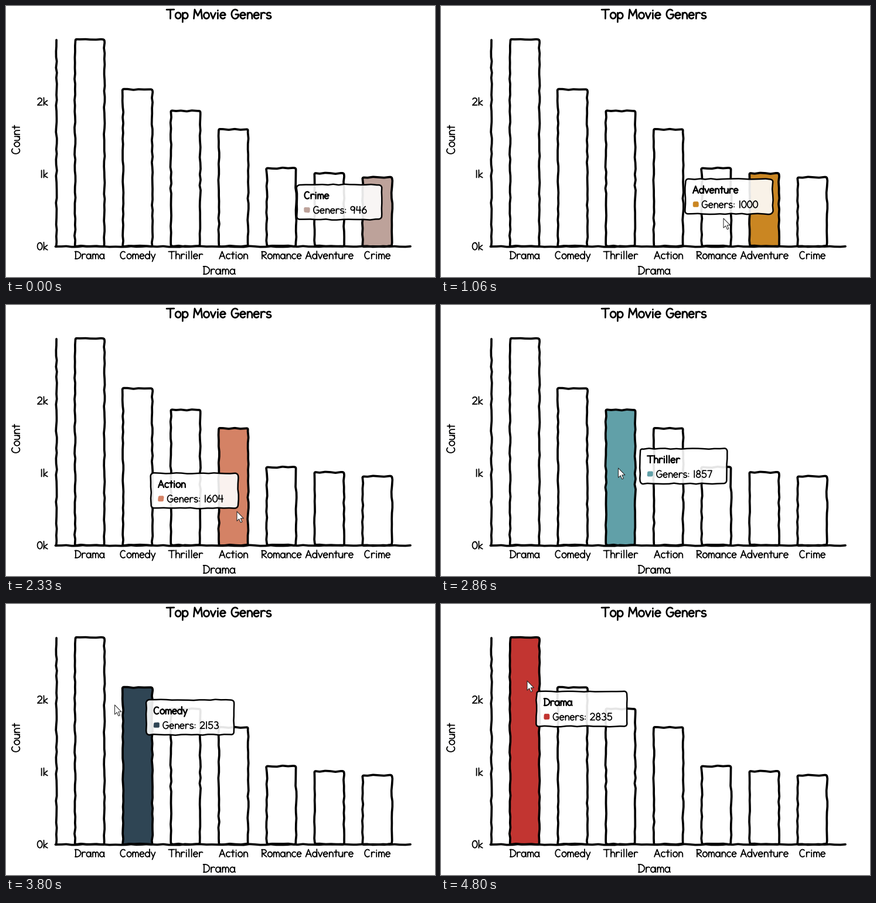
Recreate the animation shown at these times as a matplotlib script. Size 732 by 462 pixels, loop 4.87 s.

```python
import numpy as np
import matplotlib.pyplot as plt
from matplotlib.animation import FuncAnimation
from matplotlib.patches import PathPatch
from matplotlib.path import Path

W, H, DPI = 732, 462, 64
LOOP_MS, FRAMES = 4870, 146
INK = "black"
rng = np.random.default_rng(4)

GENRES = ["Drama", "Comedy", "Thriller", "Action", "Romance", "Adventure", "Crime"]
COUNTS = [2835, 2153, 1857, 1604, 1071, 1000, 946]
COLORS = ["#c23531", "#2f4554", "#61a0a8", "#d48265", "#749f83", "#ca8622", "#bda29a"]
BASE, PER_COUNT = 409.5, 0.1242
BAR_W, FIRST, STEP = 50, 142.7, 81.8


# ---- handwritten stroke lettering, baseline at 0, y up ----
def line(*xy):
    return np.reshape(xy, (-1, 2)).astype(float)


def arc(cx, cy, rx, ry, a0, a1):
    a = np.radians(np.linspace(a0, a1, 20))
    return np.column_stack([cx + rx * np.cos(a), cy + ry * np.sin(a)])


def join(*parts):
    return np.vstack(parts)


def ring(cx, cy, rx, ry, start=80):
    return arc(cx, cy, rx, ry, start, start + 360)


def bowl(cx=4.4):
    return ring(cx, 4.1, 3.6, 4.1, 30)


def stem(x, top, bottom=0):
    return line(x, top, x + 0.1, (top + bottom) / 2, x, bottom)


def arch(x, w):
    return join(arc(x + w / 2, 4.5, w / 2, 3.7, 175, 0), line(x + w + 0.1, 0))


GLYPHS = {" ": (6, [])}


def glyph(char, width, *strokes):
    GLYPHS[char] = (width, strokes)


glyph("a", 10, bowl(), line(8.1, 8, 7.9, 2, 8.8, 0))
glyph("c", 8.5, arc(4.7, 4.2, 3.7, 4.2, 50, 310))
glyph("d", 9.6, bowl(), stem(8, 13))
glyph("e", 9.5, join(line(1.2, 4.4, 8, 4.8), arc(4.6, 4.2, 3.6, 4.2, 12, 318)))
glyph("h", 9.2, stem(1.5, 13), arch(1.5, 6.2))
glyph("i", 4.4, stem(2, 8), line(2, 11, 2.1, 11.4))
glyph("k", 8.5, stem(1.5, 13), line(7.4, 8, 1.8, 3.6, 7.8, 0))
glyph("l", 4.4, stem(2, 13))
glyph("m", 12.6, stem(1.4, 8), arch(1.4, 4.8), arch(6.2, 4.8))
glyph("n", 9.2, stem(1.5, 8), arch(1.5, 6.2))
glyph("o", 9.5, ring(4.7, 4.2, 3.7, 4.2))
glyph("p", 9.5, stem(1.4, 8, -4.8), bowl(5))
glyph("r", 8, stem(1.5, 8), arc(4.9, 4.5, 3.4, 3.7, 175, 50))
glyph("s", 8.4, join(arc(4.2, 6.2, 2.8, 2.1, 40, 250), arc(4, 2.1, 3.1, 2.1, 80, -150)))
glyph("t", 7.2, line(3.8, 11.6, 3.6, 0.2), line(0.6, 8, 6.5, 8.2))
glyph("u", 9.4, join(line(1.3, 8), arc(4.4, 3.3, 3.1, 3.3, 180, 360)), stem(7.7, 8))
glyph("v", 8.8, line(1, 8, 4.2, 0, 7.8, 8))
glyph("y", 9, line(1, 8, 4.4, 1), line(8, 8, 3, -4.6))
glyph("A", 11.8, line(1, 0, 5.6, 12.5, 10.6, 0), line(2.6, 4.4, 9, 4.4))
glyph("C", 11.3, arc(6, 6.2, 4.8, 6.3, 50, 310))
glyph("D", 11.8, stem(2, 12.4), join(line(0.8, 12.3), arc(3.5, 6.2, 7.2, 6.2, 88, -90), line(1.2, 0)))
glyph("G", 12, join(arc(6, 6.2, 5, 6.3, 50, 325), line(10.5, 5.8, 6.6, 5.8)))
glyph("M", 14, line(1.3, 0, 2.5, 12.5, 6.8, 4, 11.2, 12.5, 12.6, 0))
glyph("R", 10.4, stem(1.6, 12.4), join(line(0.8, 12.2), arc(4.5, 9.2, 4.2, 3.1, 90, -90), line(2, 6, 9.3, 0)))
glyph("T", 11.8, line(0.6, 12.3, 11, 12.5), stem(5.8, 12.3))
glyph("0", 10.3, ring(5, 6.2, 4.1, 6.1))
glyph("1", 4.5, stem(2.1, 12.4))
glyph("2", 10.3, join(arc(4.9, 9, 3.6, 3.4, 160, -30), line(1.2, 0.2, 9, 0.4)))
glyph("3", 10.3, join(arc(4.5, 9.3, 3.3, 3.1, 140, -80), arc(4.7, 3.2, 3.9, 3.2, 85, -145)))
glyph("4", 10.3, line(2.2, 12.4, 1.2, 5.6, 8.9, 5.8), stem(7.2, 12.4))
glyph("5", 10.3, join(line(8.3, 12.4, 2.4, 12.4, 1.8, 7), arc(4.7, 3.9, 3.9, 3.9, 120, -150)))
glyph("6", 10.3, join(line(6.8, 12.4, 3, 8.8), arc(4.9, 3.8, 3.7, 3.8, 165, 525)))
glyph("7", 9.6, line(1, 12.3, 8.4, 12.4, 3.6, 0))
glyph("8", 10.3, ring(4.9, 9.4, 2.9, 3), ring(4.9, 3.2, 3.6, 3.2))
glyph("9", 10.3, ring(4.6, 8.9, 3.4, 3.5, 0), line(8.1, 11, 7.5, 0))
glyph(":", 4, line(1.8, 1.6, 1.8, 1.9), line(1.8, 6.8, 1.8, 7.1))


def text_width(s, size):
    return size * sum(GLYPHS[c][0] for c in s)


def text_path(s, x, y, size=1.0, align=0.0, up=False):
    pen = -align * text_width(s, size)
    parts = []
    for c in s:
        width, strokes = GLYPHS[c]
        for p in strokes:
            u, v = pen + size * p[:, 0], -size * p[:, 1]
            xy = (x + v, y - u) if up else (x + u, y + v)
            parts.append(Path(np.column_stack(xy)))
        pen += size * width
    return Path.make_compound_path(*parts)


# ---- wobbly shapes ----
def rough(pts, amp, closed=False):
    pts = np.asarray(pts, float)
    if closed:
        pts = np.vstack([pts, pts[:1]])
    d = np.append(0, np.cumsum(np.hypot(*np.diff(pts, axis=0).T)))
    t = np.linspace(0, d[-1], int(d[-1] / 1.5) + 2)
    knots = np.linspace(0, d[-1], max(5, int(d[-1] / 9)))
    noise = rng.uniform(-amp, amp, (2, len(knots)))
    if closed:
        noise[:, -1] = noise[:, 0]
    xy = [np.interp(t, d, pts[:, k]) + np.interp(t, knots, noise[k]) for k in (0, 1)]
    return Path(np.column_stack(xy), closed=closed)


def round_rect(x, y, w, h, r):
    return join(arc(x + r, y + r, r, r, 180, 270), arc(x + w - r, y + r, r, r, 270, 360),
                arc(x + w - r, y + h - r, r, r, 0, 90), arc(x + r, y + h - r, r, r, 90, 180))


def shift(path, x, y):
    return Path(path.vertices + (x, y), path.codes)


fig = plt.figure(figsize=(W / DPI, H / DPI), dpi=DPI, facecolor="white")
ax = fig.add_axes([0, 0, 1, 1])
ax.set_xlim(0, W)
ax.set_ylim(H, 0)
ax.axis("off")


def add(path, px, z=1, face="none", edge=INK):
    patch = PathPatch(path, facecolor=face, edgecolor=edge, linewidth=px * 72 / DPI,
                      capstyle="round", joinstyle="round", zorder=z)
    return ax.add_patch(patch)


# ---- static chart ----
add(text_path("Top Movie Geners", 363.5, 21.5, 1.24, 0.5), 2.7)
add(text_path("Drama", 364, 457.3, 1.08, 0.5), 1.8)
add(text_path("Count", 23.3, 228, 1.08, 0.5, up=True), 1.8)
for k in range(3):
    add(text_path(f"{k}k", 71.5, 415.8 - k * 123.3, 1, 1), 1.8)

bars, spans = [], []
for i, (name, n) in enumerate(zip(GENRES, COUNTS)):
    mid, tall = FIRST + STEP * i, n * PER_COUNT
    shape = round_rect(mid - BAR_W / 2, BASE - tall, BAR_W, tall, 2)
    bars.append(add(rough(shape, 0.9, True), 3.7))
    spans.append((mid - BAR_W / 2, mid + BAR_W / 2, BASE - tall))
    add(text_path(name, mid + 0.3, 431, 1, 0.5), 1.8)

add(rough([(86, 58), (86, 410)], 0.9), 3.7, 2)
add(rough([(85, 410), (690, 410)], 0.7), 3.7, 2)

# ---- tooltip, one layout per genre ----
TIP_H, TIP_SIZE = 59.5, 0.95
tips = []
for name, n in zip(GENRES, COUNTS):
    label = f"Geners: {n}"
    w = text_width(label, TIP_SIZE) + 52
    tips.append((w, [rough(round_rect(0, 0, w, TIP_H, 5), 0.8, True),
                     rough(round_rect(12.5, 38.5, 9.5, 9, 2), 0.5, True),
                     text_path(name, 12, 24, TIP_SIZE),
                     text_path(label, 27.5, 49, TIP_SIZE)]))

blank = Path([(0, 0), (0, 0)])
tip_art = [add(blank, 2.5, 5, (1, 1, 1, 0.9)), add(blank, 0.5, 6),
           add(blank, 2.3, 6), add(blank, 1.7, 6)]

ARROW = Path(line(0, 0, 0, 16.2, 3.7, 12.8, 6.4, 18.8, 8.9, 17.7, 6.3, 11.8, 11.4, 11.8, 0, 0),
             closed=True)
cursor = add(ARROW, 1, 9, "white", "#222222")

# (step, x, y): the drawn pointer runs ahead of the position the chart reacts to
POINTER = [(0, 640, 373), (8, 570, 368), (16, 482, 362), (25, 453, 359), (35, 394, 352),
           (51, 211, 204), (63, 160, 140), (70, 148, 132), (71, 148, 132), (72, 147, 131)]
HOVER = [(0, 651, 374), (6, 622, 371), (8, 600, 369), (15, 580, 365), (16, 576, 364.5),
         (25, 476, 364.5), (35, 406, 356.5), (51, 241, 272.5), (62, 209, 200), (63, 190, 165),
         (66, 165, 142), (70, 148, 132), (71, 148, 132), (72, 147, 131)]


def at(keys, step):
    s, x, y = np.transpose(keys)
    return np.interp(step, s, x), np.interp(step, s, y)


def draw(frame):
    step = (frame + 1) // 2  # the screen refreshes on every second frame
    mx, my = at(HOVER, step)
    hit = next((i for i, (a, b, top) in enumerate(spans) if a <= mx <= b and my >= top), None)
    for i, bar in enumerate(bars):
        bar.set_facecolor(COLORS[i] if i == hit else "none")
    for art in tip_art:
        art.set_visible(hit is not None)
    if hit is not None:
        w, paths = tips[hit]
        left = mx - 10 - w if mx > W / 2 else mx + 16
        top = my - 10 - TIP_H if my > 170 else my + 18
        for art, path in zip(tip_art, paths):
            art.set_path(shift(path, left, top))
        tip_art[1].set_facecolor(COLORS[hit])
        tip_art[1].set_edgecolor(COLORS[hit])
    cursor.set_visible(step > 0)
    cursor.set_path(shift(ARROW, *at(POINTER, step)))
    return [*bars, *tip_art, cursor]


anim = FuncAnimation(fig, draw, frames=FRAMES, interval=LOOP_MS / FRAMES,
                     init_func=lambda: draw(0), repeat=True, repeat_delay=0)
plt.show()
```
